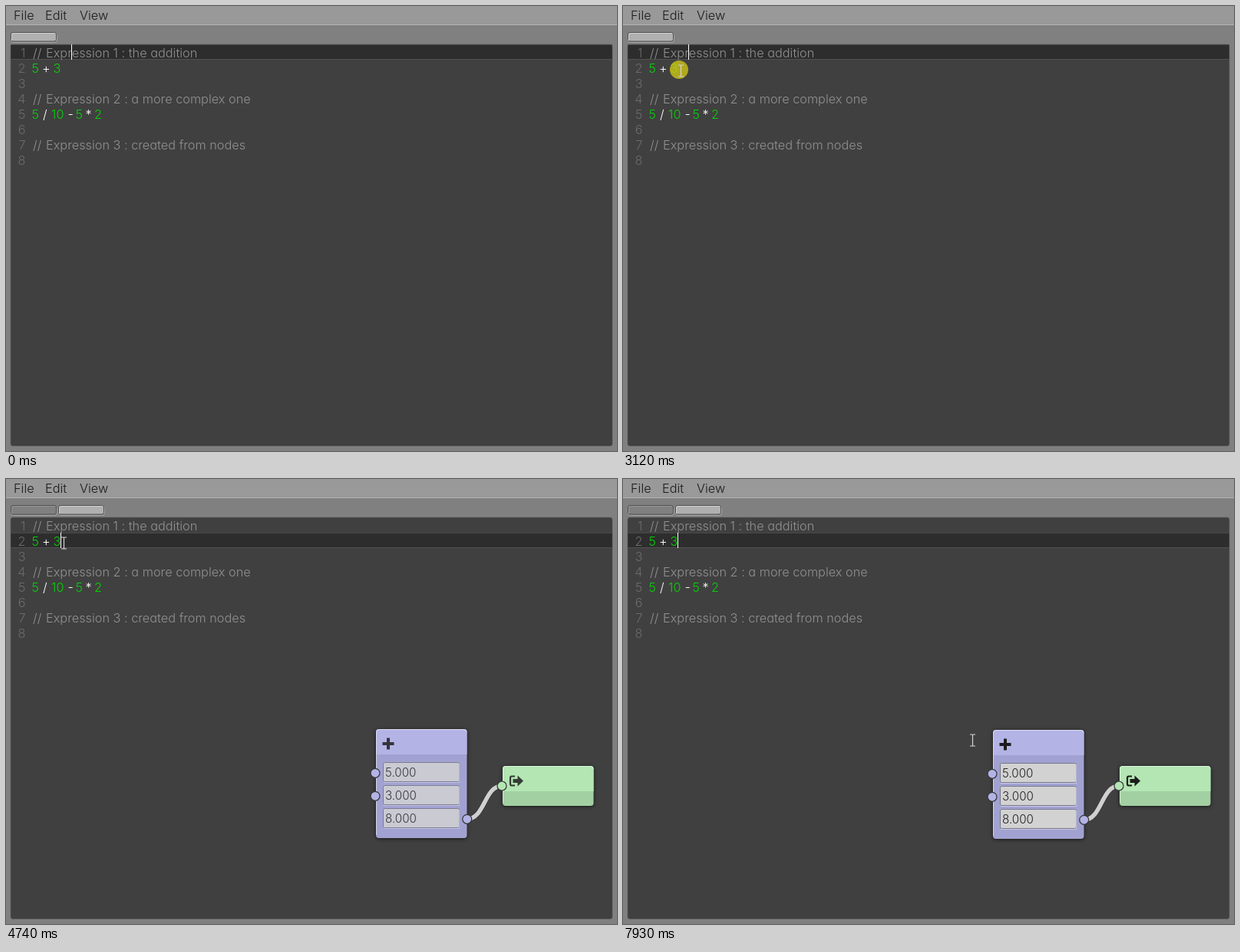
Recreate the animation shown at these times as an HTML page. Size 796 by 580 pixels, loop 8000 ms.

```html
<!DOCTYPE html>
<html lang="en">
<head>
<meta charset="utf-8">
<title>Node editor</title>
<style>
  html, body { margin: 0; width: 796px; height: 580px; overflow: hidden; background: #808080; }
  svg { display: block; }
  text { font: 300 16.3px Inter, Lato, sans-serif; font-feature-settings: "cv11"; white-space: pre; }
  .menu { fill: #1c1c1c; }
  .lineNo { fill: #6b6b6b; text-anchor: end; }
  .comment { fill: #919191; }
  .number { fill: #06d206; }
  .operator { fill: #fff; }
  .value, .tip { font-size: 15.2px; fill: #222; }
  .shadow { filter: drop-shadow(0 1px 2.5px rgba(0, 0, 0, .65)); }
</style>
</head>
<body>
<svg id="stage" width="796" height="580" viewBox="0 0 796 580"></svg>
<script>
const LOOP = 8000, CLICK = 3120, PARSED = 3810;
const BLINK = 395;

const rect = (x, y, w, h, fill, more = '') =>
  `<rect x="${x}" y="${y}" width="${w}" height="${h}" fill="${fill}" ${more}/>`;
const label = (x, y, kind, str) => `<text x="${x}" y="${y}" class="${kind}">${str}</text>`;
const port = (x, y, fill) =>
  `<circle cx="${x}" cy="${y}" r="6" fill="${fill}" stroke="#333" stroke-width="1.2"/>`;
const baseline = line => 47 + line * 20;

function menuBar() {
  return rect(0, 0, 796, 24, '#999') + rect(0, 24, 796, 1, '#b4b4b4') +
    label(10, 18, 'menu', 'File') + label(51, 18, 'menu', 'Edit') + label(96, 18, 'menu', 'View');
}

function tab(id, x) {
  return `<g id="${id}">` + rect(x + .5, 35.5, 60, 12, 'none', 'rx="3" stroke="#a6a6a6"') +
    rect(x + .5, 34.5, 59, 11.5, '#b0b0b0', 'class="face" rx="2.5" stroke="#505050"') +
    `<path class="shine" d="M${x + 1.5} 45V38q0-2.5 2.5-2.5H${x + 58}" fill="none" stroke="#d4d4d4"/></g>`;
}

function code() {
  let out = '';
  for (let n = 1; n <= 8; n++) out += label(25.5, baseline(n), 'lineNo', n);
  const comments = [
    [1, 'Expression 1 : the addition'],
    [4, 'Expression 2 : a more complex one'],
    [7, 'Expression 3 : created from nodes']
  ];
  for (const [line, str] of comments)
    out += label(35, baseline(line), 'comment', '//') + label(52, baseline(line), 'comment', str);
  const tokens = (line, list) => list.forEach(([x, str]) => {
    out += label(x, baseline(line), /\d/.test(str) ? 'number' : 'operator', str);
  });
  tokens(2, [[33.5, '5'], [47, '+'], [61.5, '3']]);
  tokens(5, [[33.5, '5'], [48, '/'], [59, '10'], [80.5, '-'], [90.5, '5'], [103.5, '*'], [115, '2']]);
  return out;
}

function nodeBox(w, h, head, headFill, bodyFill) {
  return `<g class="shadow">${rect(0, 0, w, h, bodyFill, 'rx="4"')}
    <path d="M0 ${head}V4q0-4 4-4H${w - 4}q4 0 4 4V${head}Z" fill="${headFill}"/></g>
    <path d="M.5 ${h - 4}V4q0-3.5 3.5-3.5H${w - 4}q3.5 0 3.5 3.5" fill="none" stroke="#fff" stroke-opacity=".55"/>`;
}

function field(y, str) {
  return rect(9.5, y + .5, 99, 25, '#d2d2d2', 'rx="2" stroke="#77778c"') +
    `<path d="M10 ${y + 26.5}H108.5V${y + 2}" fill="none" stroke="#e4e4ee" stroke-opacity=".6"/>` +
    label(12, y + 19, 'value', str);
}

function sumNode() {
  return `<g id="sum">${nodeBox(118.5, 142, 33, '#b3b3e6', '#a2a2d2')}
    <g class="fade"><path d="M16 11.5v15M8.5 19h15" stroke="#1c1c1c" stroke-width="4"/>
    ${field(43, '5.000')}${field(73, '3.000')}${field(103, '8.000')}</g>
    ${port(-1, 57.3, '#b3b3e6')}${port(-1, 87.3, '#b3b3e6')}</g>`;
}

function resultNode() {
  return `<g transform="translate(647 374)">${nodeBox(118.5, 52, 33, '#b3e6b3', '#a2d0a2')}
    <g class="fade"><path d="M16 13.5h-4q-2 0-2 2v8q0 2 2 2h4" fill="none" stroke="#1c1c1c" stroke-width="2.2"/>
    <path d="M13.5 17h6v-4.5l7.5 7-7.5 7V22h-6Z" fill="#1c1c1c"/></g></g>`;
}

const stage = document.getElementById('stage');
stage.innerHTML = menuBar() + tab('tabA', 6) + tab('tabB', 68) +
  rect(6, 50, 784, 523.5, '#404040', 'rx="3" stroke="#606060" stroke-width=".6"') +
  `<g id="active">${rect(6.5, 0, 783, 20, '#2d2d2d')}${rect(6.5, 0, 783, 1, '#484848')}${rect(6.5, 19, 783, 1, '#505050')}</g>` +
  code() + rect(0, 0, 1, 20, '#fff', 'id="caret"') +
  `<g id="graph">${sumNode()}${resultNode()}
    <path id="wireEdge" fill="none" stroke="#303030" stroke-opacity=".5" stroke-width="7"/>
    <path id="wire" fill="none" stroke="#d0d0d0" stroke-width="5.5"/>
    <g id="outPort">${port(0, 0, '#b3b3e6')}</g>${port(646, 400, '#b3e6b3')}</g>
  <g id="tip">${rect(0, 0, 190, 40, '#a8a8a8')}${label(10, 26, 'tip', 'Source expression: "5"')}</g>
  <circle id="click" cx="73" cy="83" r="12" fill="rgb(213,203,21)" fill-opacity=".76"/>
  <path id="arrow" d="M.7.7V21.5L5.3 17.3 8.7 25 12.3 23.4 9 15.9H15.2Z" fill="#fff" stroke="#15151f" stroke-width="1.2"/>
  <path id="beam" d="M-3.5-7.5H-1Q0-7.5 0-6.5 0-7.5 1-7.5H3.5M0-6.5V6.5M-3.5 7.5H-1Q0 7.5 0 6.5 0 7.5 1 7.5H3.5" fill="none" stroke-width="1.2"/>`;

const el = Object.fromEntries([...stage.querySelectorAll('[id]')].map(e => [e.id, e]));
const fades = stage.querySelectorAll('.fade');
const show = (e, on) => e.setAttribute('visibility', on ? 'visible' : 'hidden');
const move = (e, x, y) => e.setAttribute('transform', `translate(${x} ${y})`);

const easeOut = u => 1 - (1 - u) ** 2;
const easeInOut = u => u * u * (3 - 2 * u);
const linear = u => u;

// Pointer stops: time, x, y, easing used on the way there
const stops = [
  [900, 652, 560], [1130, 351, 320, easeOut],
  [1290, 351, 320], [1440, 290, 276, easeOut],
  [1750, 290, 276], [2050, 290, 256, easeInOut],
  [2210, 290, 256], [2275, 205, 207], [2290, 205, 207], [3050, 73, 82, easeOut],
  [CLICK - 1, 73, 82], [CLICK, 75, 84], [4590, 75, 84], [4700, 75, 83],
  [4860, 75, 83], [6100, 509, 389, easeInOut],
  [6690, 509, 389], [6910, 518, 404, easeInOut],
  [7620, 518, 404], [7930, 455, 340, easeInOut], [LOOP, 455, 340]
];

function pointerAt(t) {
  const i = stops.findIndex(s => s[0] > t);
  if (i <= 0) return [stops[0][1], stops[0][2]];
  const [t0, x0, y0] = stops[i - 1], [t1, x1, y1, ease = linear] = stops[i];
  const u = ease((t - t0) / (t1 - t0));
  return [x0 + (x1 - x0) * u, y0 + (y1 - y0) * u];
}

function caretOn(t) {
  const phase = t < PARSED ? (t - 270) / BLINK + 1 : (t - 3900) / BLINK;
  return t >= PARSED && t < 3900 || Math.floor(phase) % 2 === 0;
}

function drawGraph(t) {
  const age = t - PARSED;
  const lag = Math.exp(-age / 195);
  const x = Math.round(482 - 14.5 * lag), y = Math.round(327 - 118 * lag);
  move(el.sum, x, y);
  const px = x + 118.7, py = y + 117.3, mid = (px + 646) / 2;
  const d = `M${px} ${py}C${mid} ${py} ${mid} 400 646 400`;
  el.wire.setAttribute('d', d);
  el.wireEdge.setAttribute('d', d);
  move(el.outPort, px, py);
  const alpha = 1 - Math.exp(-age / 510);
  fades.forEach(f => f.setAttribute('opacity', alpha));
}

function setTab(tabEl, active) {
  tabEl.querySelector('.face').setAttribute('fill', active ? '#b0b0b0' : '#808080');
  tabEl.querySelector('.shine').setAttribute('stroke', active ? '#d4d4d4' : '#989898');
}

function draw(t) {
  const parsed = t >= PARSED;
  setTab(el.tabA, !parsed);
  setTab(el.tabB, true);
  show(el.tabB, parsed);
  move(el.active, 0, parsed ? 70 : 50);
  move(el.caret, parsed ? 71 : 85, parsed ? 70 : 50);
  show(el.caret, caretOn(t));
  show(el.graph, parsed);
  if (parsed) drawGraph(t);

  const [x, y] = pointerAt(t).map(Math.round);
  const typing = t >= CLICK;
  show(el.arrow, t >= 900 && !typing);
  show(el.beam, typing);
  show(el.click, typing && t < 3200);
  move(el.arrow, x, y);
  move(el.beam, x + .5, y + .5);
  const overNode = parsed && x > 482 && x < 600 && y > 327;
  el.beam.setAttribute('stroke', overNode ? '#333' : '#d4d4d4');
  show(el.tip, t >= 5900 && t < 7760);
  move(el.tip, x + 22, y);
}

const start = performance.now();
function tick() {
  draw((performance.now() - start) % LOOP);
  requestAnimationFrame(tick);
}
tick();
</script>
</body>
</html>
```
